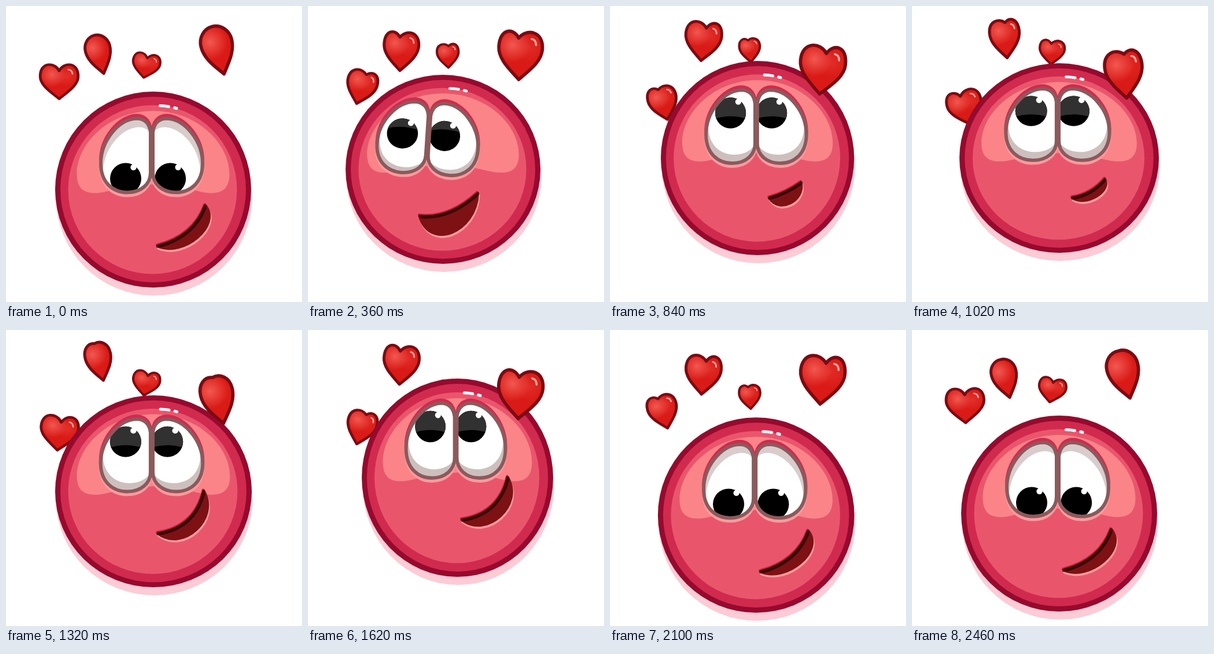
Animation, 512 px wide and 512 px high, one loop 2.52 s. Source, as an HTML page with a canvas:

```html
<!DOCTYPE html>
<html>
<head>
<meta charset="utf-8">
<style>
  html, body { margin: 0; width: 100%; height: 100%; overflow: hidden; background: #fff; }
  canvas { display: block; width: 512px; height: 512px; }
</style>
</head>
<body>
<canvas id="stage" width="512" height="512"></canvas>
<script>
const ctx = document.getElementById('stage').getContext('2d');
const LOOP = 2520, STEP = 60, HEART_CYCLE = 2480;

// head x, y, rx, ry | eyes x, y, tilt, gaze | mouth: left, right, upper bend, lower bend
const rest = [254.5, 317.5, 169.5, 169.5, -2.5, -59, 0, 40, 8, 98, 90, 28, 71, 81, 86, 89];
const left = [233.5, 282.5, 168.5, 163.5, -26, -55.5, 3.6, -6, -40, 81, 60, 42, 10, 87, 17, 125];
const tall = [256, 263, 159, 174, -2, -49.5, 0, -23, 12, 70, 70, 46, 40, 57, 46, 114];
const wide = [254.5, 263, 172.5, 164, -2.5, -60, 0, -24, 23, 69, 79, 37, 57, 63, 68, 71];
const smile = [258.5, 255.5, 165.5, 171.5, -3, -63.5, 0, -24, 8, 73, 87, 0, 72, 63, 83, 76];
const peek = [233.5, 297, 163.5, 169, -35, -27, 4, 23, -35, 116, 52, 61, 28, 113, 32, 124];
const withHead = (pose, ...head) => [...head, ...pose.slice(4)];

const keys = [
  [0, rest],
  [120, withHead(rest, 253, 334, 172, 163)],
  [360, left],
  [600, tall],
  [1020, wide],
  [1320, withHead(smile, 255, 279, 170, 166)],
  [1620, smile],
  [1860, peek],
  [1980, withHead(rest, 244, 328, 171, 167)],
  [2160, rest],
  [LOOP, rest]
];

// Monotone cubic interpolation: smooth, never overshoots a key
function poseAt(t) {
  let k = 0;
  while (t >= keys[k + 1][0]) k++;
  const span = keys[k + 1][0] - keys[k][0], u = (t - keys[k][0]) / span;
  return rest.map((_, i) => {
    const slope = j => j < 0 || j >= keys.length - 1 ? 0
      : (keys[j + 1][1][i] - keys[j][1][i]) / (keys[j + 1][0] - keys[j][0]);
    const tangent = j => {
      const a = slope(j - 1), b = slope(j);
      return a * b > 0 ? 2 * a * b / (a + b) * span : 0;
    };
    const from = keys[k][1][i], to = keys[k + 1][1][i], ease = u * u * (3 - 2 * u);
    return from + (to - from) * ease + u * (1 - u) * ((1 - u) * tangent(k) - u * tangent(k + 1));
  });
}

function at(x, y, draw, angle = 0, sx = 1, sy = sx) {
  ctx.save();
  ctx.translate(x, y);
  ctx.rotate(angle);
  ctx.scale(sx, sy);
  draw();
  ctx.restore();
}

function oval(x, y, rx, ry, color) {
  ctx.beginPath();
  ctx.ellipse(x, y, rx, ry, 0, 0, 7);
  ctx.fillStyle = color;
  ctx.fill();
}

function paint(path, fill, stroke, width) {
  ctx.fillStyle = fill;
  ctx.fill(path);
  if (!stroke) return;
  ctx.strokeStyle = stroke;
  ctx.lineWidth = width;
  ctx.stroke(path);
}

function line(d, color, width) {
  ctx.strokeStyle = color;
  ctx.lineWidth = width;
  ctx.stroke(new Path2D(d));
}

function glow(x, y, r, rgb, alpha) {
  const g = ctx.createRadialGradient(x, y, 0, x, y, r);
  g.addColorStop(0, `rgba(${rgb},${alpha})`);
  g.addColorStop(1, `rgba(${rgb},0)`);
  return g;
}

function heart(x, y, sx, sy, spin, tilt) {
  const face = Math.abs(Math.sin(spin)), w = Math.hypot(26.5, 32 * face);
  const n = -0.12 * w * Math.sin(2 * spin), top = -42 + 16 * face;
  const lobe = side => {
    const e = side * w, c = n + (e - n) * (0.55 - 0.3 * face);
    return [c, -42 - 6 * face, e, -29 - 19 * face, e, -13];
  };
  const [c, cy, e, ey] = lobe(-1);
  const shape = new Path2D(`M${n} ${top}C${lobe(1)}C${w} 9 ${w * 0.4} 26 0 41` +
    `C${-w * 0.4} 26 ${-w} 9 ${-w} -13C${e} ${ey} ${c} ${cy} ${n} ${top}Z`);
  at(x, y, () => {
    paint(shape, '#d91a16');
    paint(shape, glow(w * 0.4, -14, 26, '240,80,72', 0.4 * face));
    paint(shape, glow(-w * 0.38, -17, 30, '248,104,96', 0.8));
    ctx.strokeStyle = '#7c0a12';
    ctx.lineWidth = 3.6 + 2 / sx;
    ctx.stroke(shape);
    if (face > 0.5) line(`M${w * 0.48} -29Q${w * 0.68} -28 ${w * 0.7} -19`, '#f6a39d', 3.5);
  }, tilt * Math.PI / 180, sx, sy);
}

const eyeShape = new Path2D('M-2 -40C-4 -58 -15 -64 -27 -64C-58 -62 -88 -25 -88 14' +
  'C-88 48 -66 64 -42 64C-18 64 -2 49 -2 30Z');
const blush = new Path2D('M0 -136C78 -136 132 -78 132 -27C132 0 118 6 100 6C80 6 72 -3 0 -9' +
  'C-72 -3 -80 6 -100 6C-118 6 -132 0 -132 -27C-132 -78 -78 -136 0 -136Z');

function eye(side, gaze) {
  ctx.save();
  ctx.scale(-side, 1);
  ctx.save();
  ctx.clip(eyeShape);
  paint(eyeShape, gaze > 0 ? '#d8cccc' : '#cebfbf');
  at(4, 15 * Math.tanh((gaze - 2) / 10), () => paint(eyeShape, '#fff'));
  ctx.scale(-side, 1);
  const x = side < 0 ? -45 : 29 + gaze * 0.08;
  at(x, gaze, () => {
    oval(0, 0, 27, 27, '#000');
    const shine = -18 - gaze;
    if (shine > -27) {
      ctx.save();
      ctx.clip(new Path2D(`M-30 -30H30V${shine + 5}Q0 ${shine - 5} -30 ${shine + 5}Z`));
      oval(0, 0, 27, 27, '#313131');
      ctx.restore();
    }
    oval(13.5, -19.5, 5.2, 5.2, '#fff');
  });
  ctx.restore();
  ctx.strokeStyle = '#8b5a5c';
  ctx.lineWidth = 6;
  ctx.stroke(eyeShape);
  ctx.restore();
}

function eyes(gaze) {
  for (const [dy, color] of [[-5, '#d12a4f'], [5, '#fd9a9d']])
    for (const flip of [1, -1])
      at(0, dy, () => paint(eyeShape, color, color, 6), 0, flip, 1);
  eye(-1, gaze);
  eye(1, gaze);
}

function mouth([lx, ly, rx, ry, ux, uy, dx, dy]) {
  const bx = 0.4 * (rx - lx), by = 0.4 * (ry - ly);
  const upper = `M${lx} ${ly}Q${ux} ${uy} ${rx} ${ry}`;
  const shape = new Path2D(`${upper}C${dx + bx} ${dy + by} ${dx - bx} ${dy - by} ${lx} ${ly}Z`);
  at(1.5, 3.5, () => paint(shape, '#fd9a9d', '#fd9a9d', 5));
  at(-1, -2, () => paint(shape, '#c3203f', '#c3203f', 5));
  paint(shape, '#7d1113', '#7d1113', 5);
  ctx.save();
  ctx.clip(shape);
  line(upper, '#3a0305', 7);
  ctx.restore();
  line(upper, '#3a0305', 5);
}

function head([x, y, rx, ry, ex, ey, tilt, gaze, ...lips]) {
  oval(x + 1.5, y + 14, rx, ry, '#fbccd6');
  at(x, y, () => {
    oval(0, 0, 169.5, 169.5, '#960a2d');
    oval(0, 0, 160.5, 160.5, '#d12a4f');
    oval(-1, 0, 146, 146, '#e9566c');
    paint(blush, '#fb8488');
    line('M12 -145Q20 -145 27 -143.5M37 -141.5L40.5 -140.5', '#fff', 5);
    at(ex, ey, () => eyes(gaze), tilt * Math.PI / 180);
  }, 0, rx / 169.5, ry / 169.5);
  at(x, y, () => mouth(lips));
}

function frame(now) {
  const t = Math.floor(now % LOOP / STEP) * STEP;
  const a = 2 * Math.PI * t / HEART_CYCLE, { sin, cos, PI } = Math;
  ctx.clearRect(0, 0, 512, 512);
  ctx.lineCap = ctx.lineJoin = 'round';
  heart(92, 155 - 24 * cos(a), 0.79, 0.72, a + PI / 2, 16 * sin(2 * a));
  heart(161, 69 + 15 * cos(a), 0.82, 0.82, a, -14 * cos(2 * a));
  heart(242, 96 - 20 * cos(a - 1.95), 0.57, 0.51, a + PI / 2, 11 * cos(2 * a));
  head(poseAt(t));
  heart(367, 99 - 22 * cos(a), 1.03, 1.02, a, -14 * cos(2 * a));
}

const start = performance.now();
(function tick() {
  frame(performance.now() - start);
  requestAnimationFrame(tick);
})();
</script>
</body>
</html>
```
